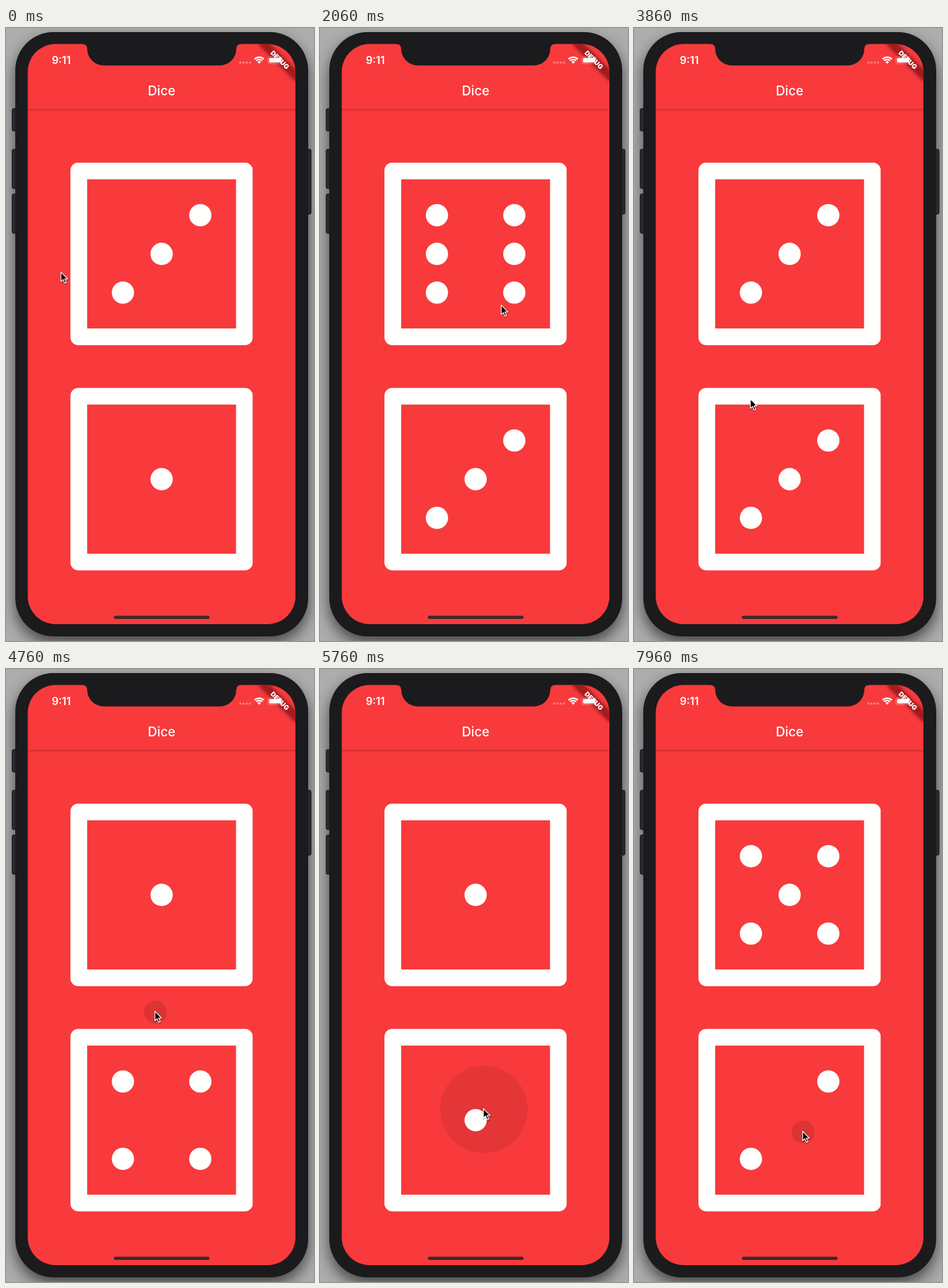
Recreate the animation shown at these times as an HTML page. Size 531x1055 px, loop 8 s.

```html
<!DOCTYPE html>
<html lang="en">
<head>
<meta charset="utf-8">
<title>Dice</title>
<style>
  html, body { margin: 0; width: 100%; height: 100%; overflow: hidden; background: #aaa; }
  svg { display: block; width: 100%; height: 100%; }
  text { font-family: Inter, Roboto, sans-serif; fill: #fff; text-anchor: middle; }
</style>
</head>
<body>
<svg viewBox="0 0 531 1055">
  <defs>
    <linearGradient id="barShadow" x2="0" y2="1">
      <stop offset="0" stop-opacity=".17"/>
      <stop offset="1" stop-opacity="0"/>
    </linearGradient>
    <filter id="soft" x="-20%" y="-20%" width="140%" height="140%"><feGaussianBlur stdDeviation="13"/></filter>
    <filter id="blur" x="-30%" y="-100%" width="160%" height="300%"><feGaussianBlur stdDeviation="3.3"/></filter>
    <clipPath id="screen"><rect x="37.5" y="27.5" width="461.5" height="998.5" rx="48"/></clipPath>
    <g id="frame" fill="none" stroke="#fffffd">
      <rect x="125.5" y="246" width="285.5" height="285.5" stroke-width="28.8"/>
    </g>
    <clipPath id="rounded"><rect x="111" y="231.5" width="314.5" height="314.5" rx="14"/></clipPath>
  </defs>

  <rect width="531" height="1055" fill="#adadad"/>
  <rect x="16" y="19" width="505" height="1040" rx="66" opacity=".6" filter="url(#soft)"/>
  <g fill="#2a2a2c" stroke="#141415">
    <rect x="10.5" y="138.5" width="12" height="39" rx="3"/>
    <rect x="10.5" y="208.5" width="12" height="68" rx="3"/>
    <rect x="10.5" y="285.5" width="12" height="68" rx="3"/>
    <rect x="514" y="208.5" width="12" height="112" rx="3"/>
  </g>
  <rect x="16" y="7" width="505" height="1040" rx="66" fill="#1b1b1d"/>

  <g clip-path="url(#screen)">
    <rect x="37" y="27" width="463" height="1000" fill="#f83a3c"/>
    <rect x="37" y="139" width="463" height="5" fill="url(#barShadow)"/>
    <circle id="ripple"/>
    <g id="upper"><use href="#frame" clip-path="url(#rounded)"/></g>
    <g id="lower" transform="translate(0 387.7)"><use href="#frame" clip-path="url(#rounded)"/></g>
    <text x="268.3" y="116" font-size="22.3" font-weight="500">Dice</text>
    <rect x="186" y="1011.5" width="165" height="5.5" rx="2.7" fill="#38292c"/>

    <g transform="translate(499 28) rotate(45)">
      <rect x="-44.5" y="31.2" width="89" height="13.4" opacity=".5" filter="url(#blur)"/>
      <rect x="-44.5" y="31.2" width="89" height="13.4" fill="#b71c1c" fill-opacity=".63"/>
      <text y="42" font-size="11.4" font-weight="900">DEBUG</text>
    </g>

    <text x="95.3" y="62" font-size="18.2" font-weight="600">9:11</text>
    <path d="M404 59.5H421" stroke="#fff" stroke-opacity=".35" stroke-width="4" stroke-linecap="round" stroke-dasharray="0 5.5"/>
    <g transform="translate(436.5 61.5)" fill="none" stroke="#fff" stroke-width="2.5">
      <path d="M0 0L-3-3A4.3 4.3 0 0 1 3-3Z" fill="#fff" stroke="none"/>
      <path d="M-5.2-5.2A7.4 7.4 0 0 1 5.2-5.2M-8-8A11.4 11.4 0 0 1 8-8"/>
    </g>
    <rect x="451.5" y="49.5" width="25" height="12" rx="3.5" fill="none" stroke="#fff" stroke-opacity=".4"/>
    <rect x="453.5" y="51.5" width="21" height="8" rx="2" fill="#fff"/>
  </g>
  <path fill="#1b1b1d" d="M131 26V27.5Q140 27.5 140 36A29 28.5 0 0 0 169 64.5H368A29 28.5 0 0 0 397 36Q397 27.5 406 27.5V26Z"/>

  <g id="cursor" stroke-linejoin="round">
    <path d="M1 2V18.5L5 15 7.8 21.5 10.6 20.3 7.8 14H13Z" fill="none" stroke="#000" stroke-opacity=".2" stroke-width="3"/>
    <path d="M.7 1V17.2L4.5 13.8 7.3 20.2 9.9 19.1 7.1 12.8H12.1Z" stroke="#fff" stroke-width="1.3"/>
  </g>
</svg>
<script>
const LOOP = 8000;
const HOME = [94, 419];

// Each roll: press time and the upper and lower value it gives.
const rolls = [
  [-LOOP, 3, 1], [660, 4, 3], [1560, 6, 3], [2530, 4, 5], [3330, 3, 3],
  [4760, 1, 4], [5700, 1, 1], [7300, 3, 4], [7960, 5, 2]
];

// Each glide leads the pointer on to a new resting place; sway and dip bend its way.
const glides = [
  { start: 0, end: 230, to: [313, 471] },
  { start: 2030, end: 2260, to: [287, 570] },
  { start: 3670, end: 4500, to: [256, 588], sway: 128, dip: 101 },
  { start: 5230, end: 5430, to: [281, 755.5] },
  { start: 6030, end: 6360, to: [268, 423], sway: 40 },
  { start: 6770, end: 7000, to: [290, 794.5] }
];

const byId = id => document.getElementById(id);
const ripple = byId('ripple'), cursor = byId('cursor');

function setAttributes(element, values) {
  for (const name in values) element.setAttribute(name, values[name]);
}

function hasPip(value, column, row) {
  if (row === 0) return column === 0 ? value % 2 === 1 : value === 6;
  if (column === 0) return false;
  return value > (column === row ? 3 : 1);
}

// Draws a die's nine places and returns a function that shows a value on them.
function makeDie(id) {
  const places = [];
  for (const row of [-1, 0, 1]) for (const column of [-1, 0, 1]) {
    const dot = document.createElementNS('http://www.w3.org/2000/svg', 'circle');
    setAttributes(dot, { cx: 268.3 + column * 66.7, cy: 388.8 + row * 66.6, r: 19.2, fill: '#fffffd' });
    byId(id).append(dot);
    places.push({ dot, column, row });
  }
  return value => places.forEach(({ dot, column, row }) => {
    dot.style.display = hasPip(value, column, row) ? '' : 'none';
  });
}
const showUpper = makeDie('upper'), showLower = makeDie('lower');

function pointer(time) {
  let [x, y] = HOME;
  for (const { start, end, to, sway = 0, dip = 0 } of glides) {
    const u = Math.min(1, Math.max(0, (time - start) / (end - start)));
    const ease = u * u * (3 - 2 * u), left = 1 - ease, turn = 2 * Math.PI * ease;
    x += (to[0] - x) * ease - sway * left * Math.sin(turn);
    y += (to[1] - y) * ease + dip * left ** 3 * Math.sin(2 * turn);
  }
  return [x, y];
}

function draw(time) {
  const [pressed, upper, lower] = rolls.findLast(roll => roll[0] <= time);
  const age = time - pressed;
  const [pressX, pressY] = pointer(pressed);
  const [x, y] = pointer(time);
  showUpper(upper);
  showLower(lower);
  setAttributes(ripple, {
    cx: pressX + 1.6, cy: pressY + 2.5,
    r: 18.6 + Math.min(age, 200) * .93,
    opacity: Math.max(0, .115 * (1 - age / 210))
  });
  cursor.setAttribute('transform', `translate(${x} ${y})`);
}

const begin = performance.now();
function tick() {
  draw((performance.now() - begin) % LOOP);
  requestAnimationFrame(tick);
}
tick();
</script>
</body>
</html>
```
